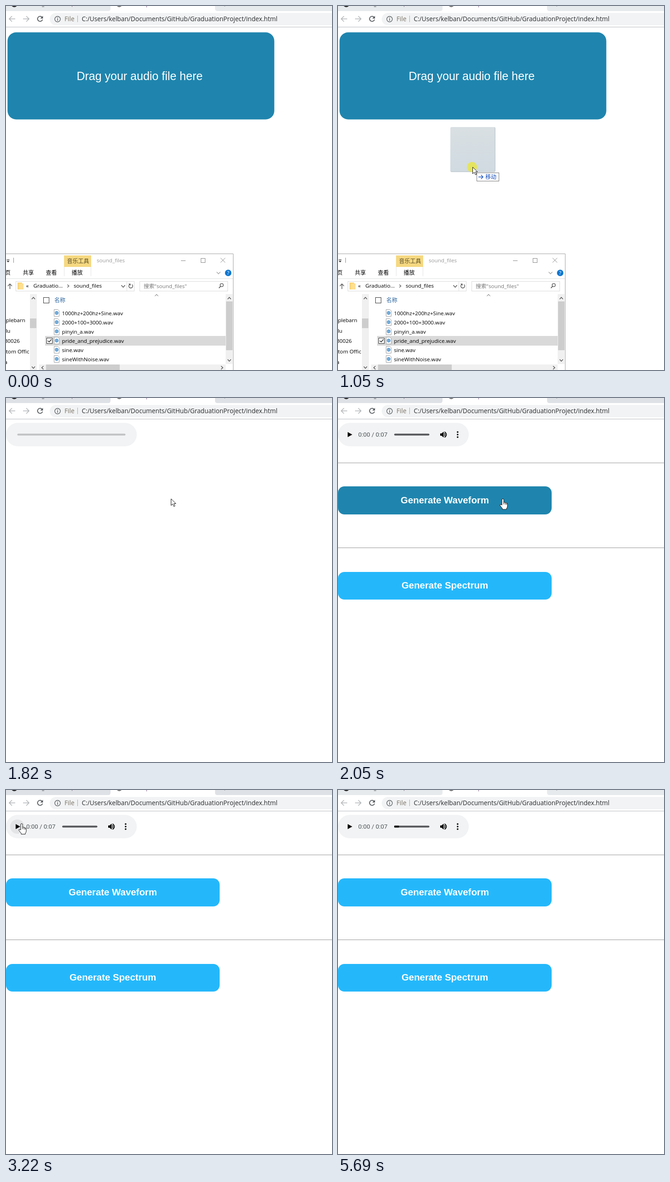
These frames come from a looping animation (708 px wide and 791 px high, 5.77 s). An HTML page:

```html
<!DOCTYPE html>
<html lang="zh">
<head>
<meta charset="utf-8">
<title>Audio upload demo</title>
<style>
html, body { margin: 0; width: 100%; height: 100%; overflow: hidden; background: #fff; }
svg { display: block; width: 708px; height: 791px; }
text { white-space: pre; }
.ui { font: 11.65px "Open Sans", "Noto Sans CJK SC", "Noto Sans CJK", sans-serif; }
.zh { font: 12px "Noto Sans CJK SC", "Noto Sans CJK", sans-serif; }
.url { font: 13.72px "Open Sans", sans-serif; }
.drop { font: 25px "Liberation Sans", Arial, sans-serif; }
.btn { font: bold 20.4px "Liberation Sans", Arial, sans-serif; }
.time { font: 13.3px Roboto, sans-serif; }
</style>
</head>
<body>
<svg id="stage" viewBox="0 0 708 791" xmlns="http://www.w3.org/2000/svg"></svg>
<script>
const LOOP = 5770;
const stage = document.getElementById('stage');

const rect = (x, y, w, h, fill, more = '') =>
  `<rect x="${x}" y="${y}" width="${w}" height="${h}" fill="${fill}" ${more}/>`;
const box = (x, y, w, h, stroke, fill = 'none') =>
  rect(x + .5, y + .5, w - 1, h - 1, fill, `stroke="${stroke}"`);
const line = (d, stroke, width = 1) =>
  `<path d="${d}" fill="none" stroke="${stroke}" stroke-width="${width}"/>`;
const shape = (d, fill, more = '') => `<path d="${d}" fill="${fill}" ${more}/>`;
const dot = (x, y, r, fill, more = '') => `<circle cx="${x}" cy="${y}" r="${r}" fill="${fill}" ${more}/>`;
const text = (x, y, s, fill = '#000', cls = 'ui', more = '') =>
  `<text x="${x}" y="${y}" class="${cls}" fill="${fill}" ${more}>${s}</text>`;
const group = (id, body, more = '') => `<g id="${id}" ${more}>${body}</g>`;

// Chevron of half width r; dir is one of u, d, l, r
const chevron = (x, y, dir, r = 3.5, color = '#555', w = 1.5) => {
  const h = r * .55, s = dir === 'u' || dir === 'l' ? -1 : 1;
  return line('ud'.includes(dir)
    ? `M${x - r} ${y - h * s}L${x} ${y + h * s}L${x + r} ${y - h * s}`
    : `M${x - h * s} ${y - r}L${x + h * s} ${y}L${x - h * s} ${y + r}`, color, w);
};

function browser() {
  return rect(0, 0, 708, 46, '#fff') +
    group('tabs', shape('M0 0H227V6Q227 11 222 11H0Z', 'inherit') +
      shape('M454 0H708V11H459Q454 11 454 6Z', 'inherit')) +
    dot(18, -4.5, 7, '#222') + dot(246, -3.5, 6, '#777') +
    line('M78 1.5H83M475 0V1', '#5f6368') + line('M143.5 0V2M305.5 0V3', '#86658c') +
    rect(95, 15, 640, 27, '#f1f3f4', 'rx="13.5"') +
    line('M20 28H7M13 22L7 28L13 34', '#b5b7b9', 1.6) +
    line('M37 28H50M44 22L50 28L44 34', '#b5b7b9', 1.6) +
    line('M78.2 24.3A5.5 5.5 0 1 0 79.3 29.5', '#55595d', 1.8) + shape('M80.3 21.5V27.3H74.5Z', '#55595d') +
    dot(112, 28.5, 6, 'none', 'stroke="#5f6368" stroke-width="1.4"') +
    rect(111.3, 27.5, 1.5, 4.5, '#5f6368') + rect(111.3, 25, 1.5, 1.5, '#5f6368') +
    text(127, 33, 'File', '#7d7468', 'url') + rect(155, 21, 1, 14, '#a5a8ab') +
    text(164.5, 33, 'C:/Users/kelban/Documents/GitHub/GraduationProject/index.html', '#2a2c2f', 'url') +
    rect(0, 45, 708, 1.4, '#c9cbce');
}

function dropZone() {
  return rect(3.3, 57.3, 579.4, 189.2, 'inherit', 'rx="18.75"') +
    text(153.4, 161, 'Drag your audio file here', '#fff', 'drop');
}

function fileRow(name, i) {
  const y = 667 + i * 20;
  return shape(`M104.5 ${y - 7.5}h8l3 3v12h-11z`, '#fff', 'stroke="#9a9da1"') +
    dot(110, y, 3, '#cfe6f6', 'stroke="#2a82c9" stroke-width="1.3"') + dot(110, y, 1.3, '#2a82c9') +
    text(121.5, y + 4.5, name);
}

function explorer() {
  const files = ['1000hz+200hz+Sine.wav', '2000+100+3000.wav', 'pinyin_a.wav',
    'pride_and_prejudice.wav', 'sine.wav', 'sineWithNoise.wav'];
  const end = 'text-anchor="end"';
  const zh = (x, y, s, color) => text(x, y, s, color, 'zh');
  const title = rect(0, 538, 494, 253, '#fff') + line('M0 538.5H493.5V791', '#a2a2a2') +
    rect(1.5, 551, 6, 1.2, '#222') + shape('M1.5 554H7.5L4.5 557Z', '#222') + rect(16, 547, 1, 11, '#888') +
    rect(126, 542, 59, 25, '#f5d881') + zh(132.5, 558.5, '音乐工具', '#574a25') +
    text(197, 557, 'sound_files', '#999') +
    line('M380 553.5H390M466 547.5L476 557.5M476 547.5L466 557.5', '#888') + box(423, 548, 10, 10, '#888');
  const ribbon = zh(-2, 584, '页') + zh(36.5, 584, '共享') + zh(86.5, 584, '查看') +
    zh(142.5, 584, '播放') + line('M126.5 567V587M184.5 567V587', '#e3e3e3') +
    chevron(461.5, 580, 'd', 4, '#999', 1.2) + dot(482.5, 580, 7, '#0b76cf') +
    text(482.5, 584.3, '?', '#fff', 'ui', 'text-anchor="middle" font-weight="700"') + rect(0, 592, 493, 1, '#dedfe0');
  const address = line('M8.5 615V604M4 608.5L8.5 604L13 608.5', '#666', 1.6) +
    box(21, 598, 258, 22, '#d9d9d9') + rect(25, 601, 10, 15, '#fbd373') + rect(28, 603, 10, 13, '#ffdf91') +
    text(43.5, 612, '«') + text(59.5, 612, 'Graduatio...') + chevron(135, 608.5, 'r', 3, '#555', 1.3) +
    text(147, 612, 'sound_files') + chevron(254.5, 609, 'd', 4) + rect(262, 599, 1, 20, '#dcdcdc') +
    line('M273.6 605.3A4.2 4.2 0 1 1 268.3 605.3', '#555', 1.4) + shape('M266 603.5H270.5V608Z', '#555') +
    box(290, 598, 192, 22, '#d9d9d9') + text(299, 612.5, '搜索"sound_files"', '#767676') +
    dot(468.5, 606.5, 3.4, 'none', 'stroke="#555" stroke-width="1.4"') + line('M466 609L462.5 613', '#555', 1.8) +
    chevron(327, 628.5, 'u', 3.5, '#555', 1);
  const side = text(42, 687, 'aplebarn', '#000', 'ui', end) + text(9.5, 710, 'lu', '#000', 'ui', end) +
    text(30, 732, '30026', '#000', 'ui', end) + text(0, 755, 'tom Office') + text(3, 778, 'a', '#000', 'ui', end) +
    rect(51, 626, 20, 165, '#fff') + rect(52, 626, 15, 165, '#f0f0f0') + rect(52, 679, 14, 21, '#cdcdcd') +
    chevron(59.5, 635, 'u') + chevron(59.5, 785.5, 'd');
  const list = box(81, 633, 13, 13, '#333') + zh(105, 643.5, '名称', '#2a64a0') +
    '<rect id="row" x="85.5" y="717.5" width="391" height="20"/>' + files.map(fileRow).join('') +
    box(88, 721, 13, 13, '#333', '#fff') + line('M91 727.5L93.7 730.2L98.5 724.5', '#222', 1.4) +
    rect(477, 626, 15, 152, '#f0f0f0') + rect(478, 642, 14, 106, '#cdcdcd') +
    chevron(485, 635, 'u') + chevron(485, 770, 'd') +
    rect(72, 779, 405, 12, '#f0f0f0') + rect(87, 779, 160, 12, '#cdcdcd') +
    chevron(79.5, 786, 'l') + chevron(469, 786, 'r');
  return title + ribbon + address + side + list;
}

function player() {
  const ready = dot(24.5, 79.5, 15.5, '#e2e4e5', 'id="halo"') +
    shape('M21 74L31 79.5L21 85Z', '#000', 'id="play"') +
    shape('M21 74h3.4v11H21zM27 74h3.4v11H27z', '#000', 'id="pause"') +
    text(44, 84.3, '0:00 / 0:07', '#4f5357', 'time') +
    rect(122, 77.5, 76.5, 4, '#55575a', 'rx="2"') + rect(122, 77.5, 0, 4, '#111', 'id="done" rx="1"') +
    shape('M222 77H225L229.5 73V86L225 82H222Z', '#000') +
    line('M231.3 76.3Q233.6 79.5 231.3 82.8M231.5 73.4Q239.4 79.5 231.5 85.7', '#000', 1.7) +
    [74, 79.5, 85].map(y => dot(259.8, y, 1.8, '#000')).join('');
  return rect(0, 54, 284, 51, '#f1f3f4', 'rx="25.5"') +
    rect(24.5, 77.5, 235, 4, '#c0c2c3', 'id="idle" rx="2"') + group('ready', ready) +
    rect(-2, 53.5, 286.5, 52, 'none', 'id="ring" stroke="#4d90fe"');
}

function button(id, y, h, label) {
  return group(id, rect(0, y, 464, h, 'inherit', 'rx="14"') +
    text(232, y + h - 24, label, '#fff', 'btn', 'text-anchor="middle"'), 'fill="#24b8fb"');
}

function results() {
  return rect(0, 140.5, 708, 1, '#949494') + button('wave', 192, 61, 'Generate Waveform') +
    rect(0, 325, 708, 1, '#949494') + button('spec', 378, 60, 'Generate Spectrum');
}

// All pointer parts are drawn around the hot spot at 0,0
function pointer() {
  const ghost = rect(-48, -87, 98, 98, '#053045', 'rx="3" opacity=".22"') +
    rect(-50, -89, 98, 98, 'url(#glass)', 'rx="3"');
  const tip = box(9, 12, 49, 19, '#767676', '#fff') +
    line('M13 21.5H23M18.5 17L23 21.5L18.5 26', '#1a53c0', 1.3) + text(28, 26, '移动', '#1049b8', 'zh');
  return group('ghost', ghost) + dot(-1, 0, 11, '#f0ea10', 'id="press" opacity=".62"') +
    group('tip', tip) +
    shape('M.5 0V14.5L4 11.3L6.5 16.8L9 15.7L6.6 10.5H11Z', '#fff', 'id="arrow" stroke="#111"') +
    group('hand', shape('M-2 2Q-2 0 0 0Q2 0 2 2V8Q4.2 6.8 5.3 8.6Q7.2 7.5 8 9.6Q10 9 10 11.5V16Q10 19 8 21V23H-1V21L-6 14.8Q-6.6 12 -4 12.4L-2 14Z',
      '#fff', 'stroke="#111"') + line('M2 8V12M5.3 8.6V12.5M8 9.8V13', '#111'));
}

stage.innerHTML =
  `<defs><linearGradient id="glass" x2="0" y2="1">
    <stop stop-color="#fff" stop-opacity=".32"/><stop offset="1" stop-color="#e6f4ff" stop-opacity=".27"/>
  </linearGradient></defs>` +
  group('zone', dropZone()) + group('player', player()) + group('results', results()) +
  browser() + group('explorer', explorer()) + group('pointer', pointer());

const el = {};
for (const node of stage.querySelectorAll('[id]')) el[node.id] = node;
const show = (id, on) => el[id].setAttribute('display', on ? 'inline' : 'none');
const fill = (id, color) => el[id].setAttribute('fill', color);

const MOVES = [
  [70, 590, 8, [[1, 640], [62, 690], [130, 746], [172, 725]]],
  [740, 1200, 7, [[172, 725], [196, 640], [292, 350], [352, 235]]],
  [1270, 1430, 3, [[363, 227], [362, 225], [358, 219]]],
  [2380, 2920, 8, [[310, 222], [248, 235], [199, 240], [150, 250], [110, 208], [76, 150], [50, 100], [38, 70]]],
  [2990, 3220, 4, [[37, 66], [36, 69], [35, 71], [34, 73]]],
  [3640, 3720, 2, [[34, 75], [34, 76]]],
  [4660, 4810, 3, [[250, 170], [613, 326], [740, 380]]]
];

function along(points, u) {
  const f = u * (points.length - 1), i = Math.min(Math.floor(f), points.length - 2);
  return points[i].map((v, k) => v + (points[i + 1][k] - v) * (f - i));
}

function pointerAt(t) {
  const move = MOVES.filter(m => t >= m[0]).pop();
  if (!move) return [-50, 640];
  const [from, to, n, points] = move;
  const k = Math.min(n - 1, Math.floor((t - from + 6) * (n - 1) / (to - from)));
  return along(points, k / (n - 1));
}

function draw(t) {
  const within = (a, b) => t >= a && t < b;
  const [x, y] = pointerAt(t);
  const focused = within(1600, 5690), loaded = t >= 1897;
  const onRow = y > 716 && y < 738 && x > 85 && within(500, 1000);
  const onWave = t >= 1973 && x < 464 && y >= 192 && y < 253;
  const onPlay = t >= 2900 && x < 60;
  const dragging = within(810, 1430);
  const playing = within(3490, 4190);

  fill('tabs', focused ? '#dee1e6' : '#e7eaed');
  show('zone', t < 1430);
  fill('zone', t >= 1270 ? '#146584' : '#1f85ae');
  show('explorer', t < 1600);
  fill('row', onRow ? '#cce8ff' : '#d9d9d9');
  el.row.setAttribute('stroke', onRow ? '#99d1ff' : '#d9d9d9');

  show('player', t >= 1600);
  show('idle', within(1820, 1897));
  show('ready', loaded);
  show('halo', within(2900, 5690));
  show('play', !playing);
  show('pause', playing);
  show('ring', within(3390, 5690));
  const done = t < 3640 ? 0 : t < 3720 ? 4 : t < 3960 ? 6 : t < 4190 ? 8 : 10.5;
  el.done.setAttribute('width', done);

  show('results', loaded);
  fill('wave', onWave ? '#1f85ae' : '#24b8fb');

  el.pointer.setAttribute('transform', `translate(${Math.round(x)} ${Math.round(y)})`);
  show('ghost', dragging);
  show('tip', dragging);
  show('press', within(660, 1430));
  show('hand', onWave || onPlay);
  show('arrow', !onWave && !onPlay);
}

const start = performance.now();
function tick(now) {
  draw(Math.max(0, now - start) % LOOP);
  requestAnimationFrame(tick);
}
draw(0);
requestAnimationFrame(tick);
</script>
</body>
</html>
```
